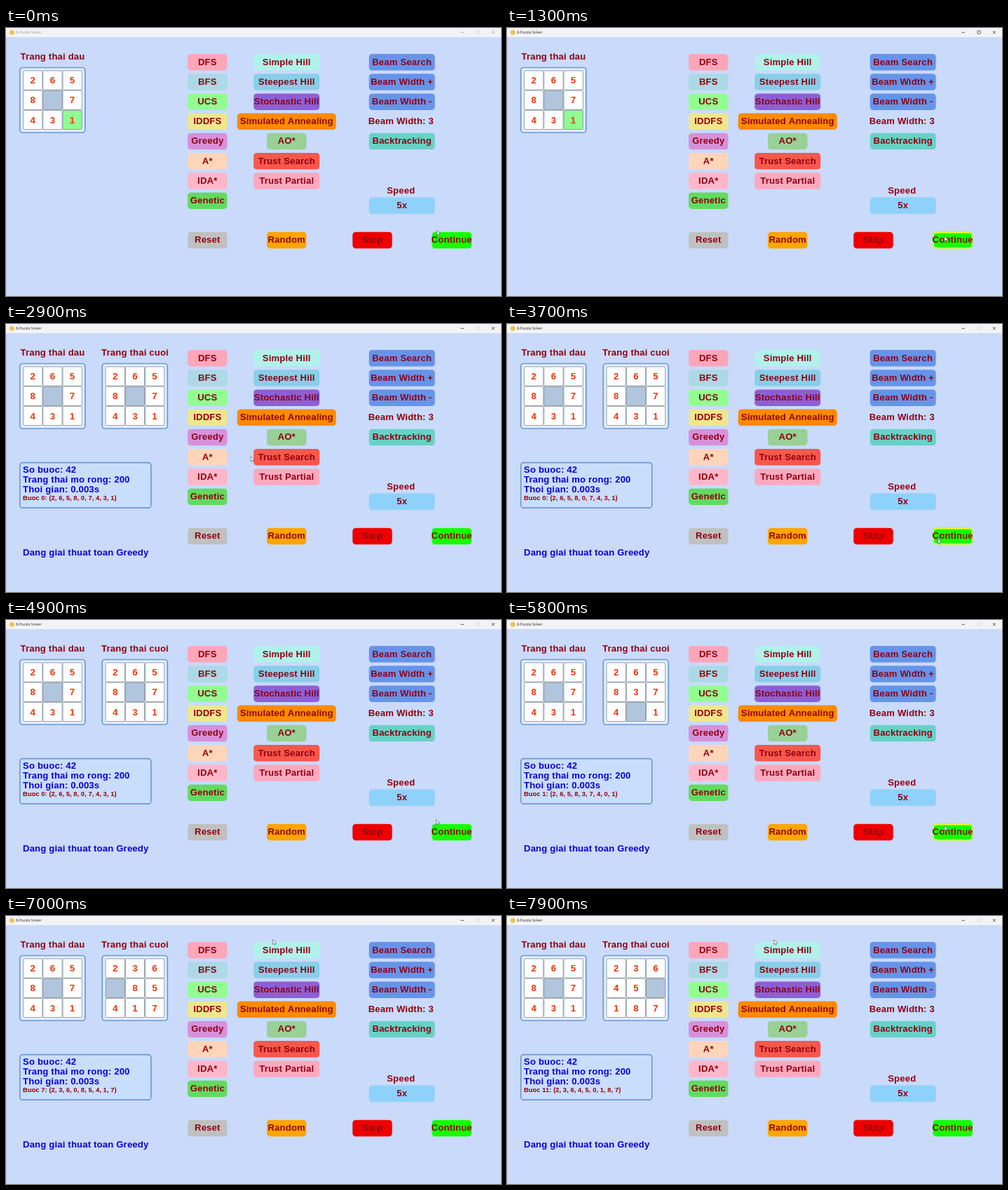
An HTML page with a canvas for the animation above (8000 ms loop, 706x382 px).

```html
<!DOCTYPE html>
<html lang="vi">
<head>
<meta charset="utf-8">
<title>8-Puzzle Solver</title>
<style>
html, body { margin: 0; width: 100%; height: 100%; overflow: hidden; background: #c9dafb; }
canvas { display: block; width: 706px; height: 382px; }
</style>
</head>
<body>
<canvas id="stage"></canvas>
<script>
const LOOP = 8000, TICK = 100;
const SOLVED_AT = 2700, FIRST_MOVE = 5660, MOVE_GAP = 220;
const FOCUS_AT = 500;
const RED = '#900010', BLUE = '#0a00d2';
const U = 0.47; // window pixels per app unit
const ROW = 60 * U, BTN_H = 50 * U;

const canvas = document.getElementById('stage');
const ctx = canvas.getContext('2d');
const ratio = window.devicePixelRatio || 1;
canvas.width = 706 * ratio;
canvas.height = 382 * ratio;
ctx.scale(ratio, ratio);

// Each column: centre x, then [row, width, label, colour]
const columns = [
  [287.3, [
    [0, 120, 'DFS', '#fca6ba'], [1, 120, 'BFS', '#add8e6'],
    [2, 120, 'UCS', '#90ff90'], [3, 120, 'IDDFS', '#f0e68c'],
    [4, 120, 'Greedy', '#d890da'], [5, 120, 'A*', '#fed5b9'],
    [6, 120, 'IDA*', '#feb6c8'], [7, 120, 'Genetic', '#64d962'],
    [9, 120, 'Reset', '#c0c0c0']]],
  [400.2, [
    [0, 200, 'Simple Hill', '#b0f2ea'], [1, 200, 'Steepest Hill', '#87cfe8'],
    [2, 200, 'Stochastic Hill', '#8c5fd6'], [3, 300, 'Simulated Annealing', '#fb8a04'],
    [4, 120, 'AO*', '#98d096'], [5, 200, 'Trust Search', '#f7574c'],
    [6, 200, 'Trust Partial', '#fca8be'], [9, 120, 'Random', '#ffa500']]],
  [564.7, [
    [0, 200, 'Beam Search', '#6694ea'], [1, 200, 'Beam Width +', '#6694ea'],
    [2, 200, 'Beam Width -', '#6694ea'], [4, 200, 'Backtracking', '#68d1c6'],
    [7.25, 200, '5x', '#8ed1fa']]],
  [522.5, [[9, 120, 'Stop', '#ee0000']]],
  [635.7, [[9, 120, 'Continue', '#14ff00']]]
];
const buttons = columns.flatMap(([cx, items]) => items.map(([row, w, label, color]) => ({
  x: cx - w * U / 2, y: 37 + row * ROW, w: w * U, cx, label, color
})));

// Pointer tip: [ms, x, y]
const pointerPath = [
  [0, 614.5, 288.5], [600, 624, 297], [1800, 624, 297], [2500, 284, 160],
  [2700, 284, 160], [3400, 612.5, 304.5], [3600, 612.5, 304.5], [3700, 614.5, 306],
  [4000, 614.5, 306], [4500, 613.5, 284.5], [4900, 613.5, 284.5], [5300, 624, 293],
  [6300, 624, 293], [6500, 452, 136], [7000, 380.5, 33.5], [LOOP, 380.5, 33.5]
];

const start = [2, 6, 5, 8, 0, 7, 4, 3, 1];
const offsets = { U: -3, D: 3, L: -1, R: 1 };
const states = [start];
for (const move of 'DRUULDLDRUR') {
  const next = states[states.length - 1].slice();
  const from = next.indexOf(0), to = from + offsets[move];
  [next[from], next[to]] = [next[to], 0];
  states.push(next);
}

function pointerAt(t) {
  const i = pointerPath.findIndex(p => p[0] > t);
  const [t0, x0, y0] = pointerPath[i - 1], [t1, x1, y1] = pointerPath[i];
  const k = (t - t0) / (t1 - t0), e = k * k * (3 - 2 * k);
  return { x: x0 + (x1 - x0) * e, y: y0 + (y1 - y0) * e };
}

function text(str, x, y, color = RED, align = 'center', size = 13.1) {
  ctx.font = `bold ${size}px "Liberation Sans", Arial, sans-serif`;
  ctx.letterSpacing = size > 10 ? '0.18px' : '0.05px';
  ctx.textAlign = align;
  ctx.textBaseline = 'alphabetic';
  ctx.fillStyle = color;
  ctx.fillText(str, x, y);
}

function box(x, y, w, h, r, fill, stroke, line = 1) {
  ctx.beginPath();
  ctx.roundRect(x, y, w, h, r);
  if (fill) { ctx.fillStyle = fill; ctx.fill(); }
  if (stroke) { ctx.strokeStyle = stroke; ctx.lineWidth = line; ctx.stroke(); }
}

function lines(points, color, width) {
  ctx.beginPath();
  for (const [x0, y0, x1, y1] of points) { ctx.moveTo(x0, y0); ctx.lineTo(x1, y1); }
  ctx.strokeStyle = color;
  ctx.lineWidth = width;
  ctx.stroke();
}

function titleBar(t) {
  const ink = t < FOCUS_AT ? '#999' : '#222';
  ctx.fillStyle = '#f3f3f5';
  ctx.fillRect(0, 0, 706, 13);
  ctx.fillStyle = '#e6c552';
  ctx.beginPath();
  ctx.arc(8.3, 6.3, 3.4, 0, 7);
  ctx.fill();
  ctx.font = '5.2px "Open Sans", "Noto Sans", sans-serif';
  ctx.letterSpacing = '0px';
  ctx.textAlign = 'left';
  ctx.fillStyle = ink;
  ctx.fillText('8-Puzzle Solver', 14.3, 8.2);
  lines([[648.5, 6.3, 653, 6.3]], ink, 0.7);
  const dim = t < FOCUS_AT || t > SOLVED_AT;
  box(671, 4, 4.2, 4.2, 0.5, null, dim ? '#cfcfd2' : ink, 0.7);
  lines([[692.8, 4, 697, 8.2], [697, 4, 692.8, 8.2]], ink, 0.7);
}

function board(x, title, cells, mark) {
  text(title, x + 47, 45.3);
  box(x + 0.3, 56.5, 93, 92.5, 4, '#e4eefb', '#6c98cf', 1.7);
  cells.forEach((n, i) => {
    const cx = x + 4.6 + (i % 3) * ROW, cy = 60.4 + Math.floor(i / 3) * ROW;
    const fill = n === 0 ? '#b1c5dc' : n === mark ? '#90fb90' : '#fff';
    box(cx + 0.5, cy + 0.5, ROW - 0.9, ROW - 0.9, 1, fill, '#8a96a4', 0.9);
    if (n) text(n, cx + ROW / 2, cy + 18.8, '#f03208');
  });
}

function button(b, p) {
  box(b.x, b.y, b.w, BTN_H, 4.5, b.color);
  if (p.x >= b.x && p.x <= b.x + b.w && p.y >= b.y && p.y <= b.y + BTN_H) {
    box(b.x + 0.8, b.y + 0.8, b.w - 1.6, BTN_H - 1.6, 4, null, '#fbf72c', 1.6);
  }
  text(b.label, b.cx, b.y + 15.6);
}

function result(step) {
  box(19.8, 197.6, 187, 64.5, 4, '#c9ddfc', '#6c98cf', 1.6);
  text('So buoc: 42', 24, 212, BLUE, 'left');
  text('Trang thai mo rong: 200', 24, 226, BLUE, 'left');
  text('Thoi gian: 0.003s', 24, 240, BLUE, 'left');
  text(`Buoc ${step}: (${states[step].join(', ')})`, 24, 251.3, RED, 'left', 9.4);
  text('Dang giai thuat toan Greedy', 24, 329.5, BLUE, 'left');
}

function pointer({ x, y }) {
  const shape = [[0, 0], [0, 7], [1.6, 5.6], [2.8, 8], [3.9, 7.5], [2.8, 5.2], [5, 5]];
  ctx.beginPath();
  shape.forEach(([dx, dy]) => ctx.lineTo(x + dx, y + dy));
  ctx.closePath();
  ctx.fillStyle = '#fff';
  ctx.fill();
  ctx.strokeStyle = '#454b58';
  ctx.lineWidth = 0.6;
  ctx.stroke();
}

function draw(t) {
  const solved = t >= SOLVED_AT;
  const count = Math.floor((t - FIRST_MOVE) / MOVE_GAP) + 1;
  const step = Math.max(0, Math.min(states.length - 1, count));
  const p = pointerAt(t);
  ctx.fillStyle = '#c9dafb';
  ctx.fillRect(0, 0, 706, 382);
  titleBar(t);
  lines([[0.25, 13, 0.25, 382]], '#8d99b0', 0.5);
  board(19.5, 'Trang thai dau', start, solved ? -1 : 1);
  if (solved) {
    board(137, 'Trang thai cuoi', states[step], -1);
    result(step);
  }
  buttons.forEach(b => button(b, p));
  text('Beam Width: 3', 563.3, 136.7);
  text('Speed', 563.3, 235.5);
  pointer(p);
}

const begin = performance.now();
let shown = -1;
function frame() {
  const t = Math.floor(((performance.now() - begin) % LOOP) / TICK) * TICK;
  if (t !== shown) draw(shown = t);
  requestAnimationFrame(frame);
}
frame();
</script>
</body>
</html>
```
